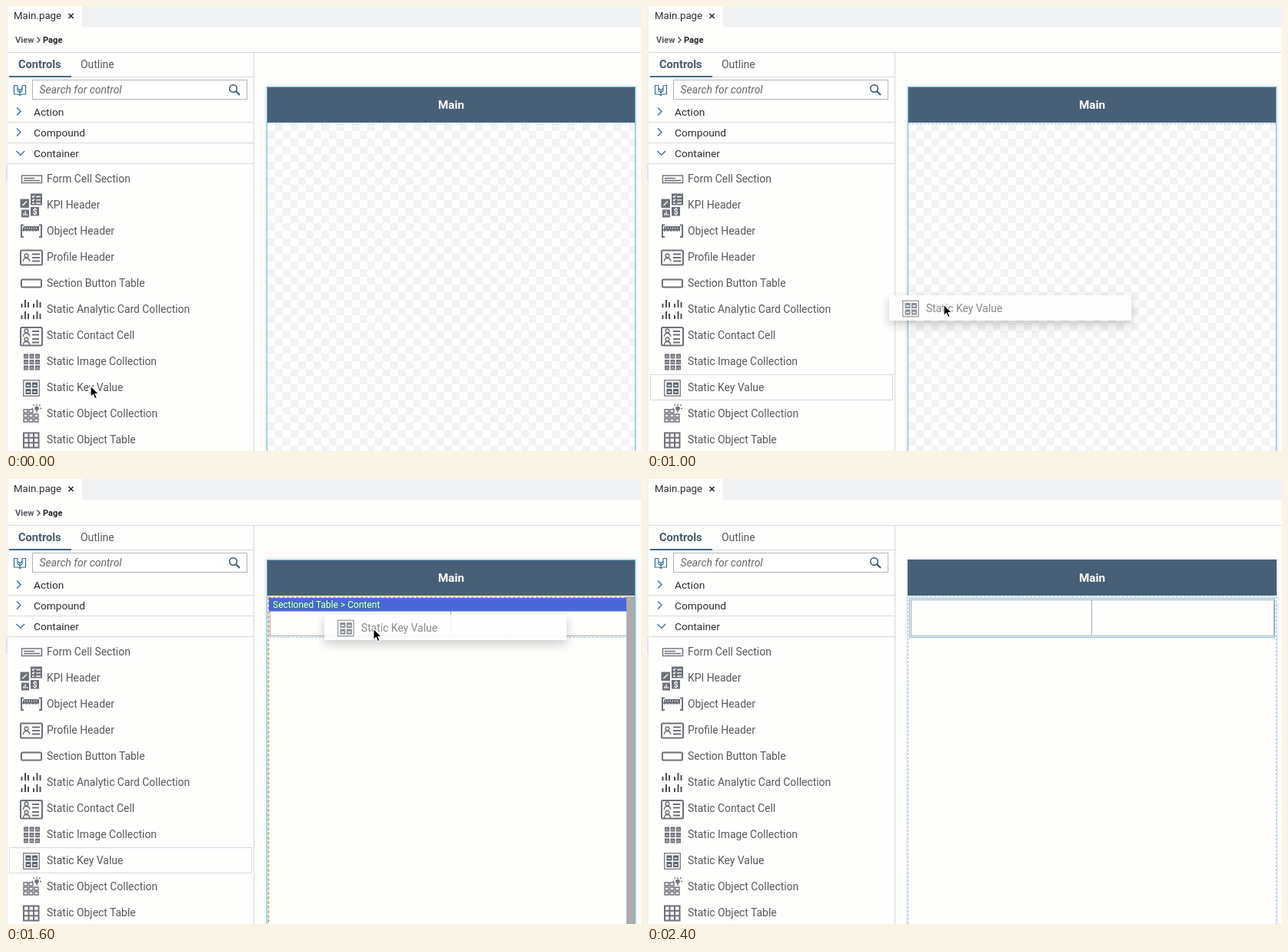
These frames come from a looping animation (826x580 px, 2.8 s). An HTML page:

```html
<!DOCTYPE html>
<html lang="en">
<head>
<meta charset="utf-8">
<title>Drag a control onto a page</title>
<style>
html, body { margin: 0; width: 100%; height: 100%; overflow: hidden; background: #fefefd; }
svg { display: block; width: 826px; height: 580px; font: 13.9px Roboto, "Liberation Sans", sans-serif; }
.dark { fill: #2b2d30; font-size: 13.7px; }
.items { fill: #55585c; }
.ln { fill: none; stroke: #d9d9da; }
.icons { fill: #6d7178; stroke: none; }
.icons .o { fill: none; stroke: #6d7178; stroke-width: 2; }
.icons .t { fill: none; stroke: #6d7178; stroke-width: 1.4; }
.icons .w { fill: none; stroke: #fff; stroke-width: 1.3; }
.sky { fill: none; stroke: #6cc4e4; }
.dash { fill: none; stroke: #8fc7e6; stroke-dasharray: 3 2; }
.grey { fill: none; stroke: #a9a9ab; }

.a { animation: 2.8s step-end infinite; }
.arrow { animation-name: arrow; }
.hand { animation-name: hand; }
.ghost { animation-name: ghost; }
.hover { animation-name: hover; }
.help { animation-name: help; }
.empty { animation-name: empty; }
.over { animation-name: over; }
.done { animation-name: done; }
.crumb { animation-name: crumb; }
.line { animation-name: line; }
.tint { animation-name: tint; }

@keyframes arrow {
  0% { opacity: 1; transform: translate(110px, 495px); }
  7.14% { opacity: 1; transform: translate(100px, 500px); }
  14.28% { opacity: 0; transform: translate(100px, 500px); }
  35.71% { opacity: 1; transform: translate(386px, 389px); }
  42.85% { opacity: 1; transform: translate(464px, 263px); }
  50% { opacity: 1; transform: translate(482px, 188px); }
  57.14% { opacity: 1; transform: translate(478px, 195px); }
  64.28%, 100% { opacity: 0; transform: translate(478px, 195px); }
}
@keyframes hand {
  0% { opacity: 0; transform: translate(92px, 499px); }
  14.28% { opacity: 1; transform: translate(92px, 499px); }
  21.42% { opacity: 1; transform: translate(69.5px, 499px); }
  28.57% { opacity: 1; transform: translate(98.5px, 499px); }
  35.71% { opacity: 0; transform: translate(98.5px, 499px); }
  64.28% { opacity: 1; transform: translate(482px, 189px); }
  78.57%, 100% { opacity: 0; transform: translate(482px, 189px); }
}
@keyframes ghost {
  0% { opacity: 0; transform: translate(315px, 377px); }
  35.71% { opacity: 1; transform: translate(315px, 377px); }
  42.85% { opacity: 1; transform: translate(397px, 257px); }
  50% { opacity: 1; transform: translate(419px, 170px); }
  57.14% { opacity: 1; transform: translate(414px, 177px); }
  64.28%, 100% { opacity: 0; transform: translate(414px, 177px); }
}
@keyframes hover { 0%, 71.42%, 100% { opacity: 0; } 14.28% { opacity: 1; } }
@keyframes help { 0%, 35.71%, 100% { opacity: 0; } 14.28% { opacity: 1; } }
@keyframes empty { 0%, 100% { opacity: 1; } 42.85% { opacity: 0; } }
@keyframes over { 0%, 71.42%, 100% { opacity: 0; } 42.85% { opacity: 1; } }
@keyframes done { 0%, 100% { opacity: 0; } 71.42% { opacity: 1; } }
@keyframes crumb { 0%, 100% { opacity: 1; } 71.42% { opacity: 0; } }
@keyframes line { 0%, 100% { opacity: .5; } 35.71% { opacity: 1; } }
@keyframes tint { 0%, 57.14%, 100% { opacity: 0; } 50% { opacity: 1; } }
</style>
</head>
<body>
<svg viewBox="0 0 826 580" xmlns="http://www.w3.org/2000/svg">
<defs>
  <pattern id="check" x="340" y="153" width="20" height="20" patternUnits="userSpaceOnUse">
    <rect width="20" height="20" fill="#fefefe"/>
    <path d="M10 0h10v10h-10zM0 10h10v10h-10z" fill="#f3f3f4"/>
  </pattern>
  <filter id="soft" x="-10%" y="-100%" width="120%" height="350%">
    <feDropShadow dx="0" dy="5" stdDeviation="7" flood-color="#000" flood-opacity=".24"/>
  </filter>
  <filter id="edge" x="-5%" y="-5%" width="110%" height="110%">
    <feDropShadow dx="0" dy="0" stdDeviation="2" flood-color="#000" flood-opacity=".2"/>
  </filter>
  <g id="person">
    <circle cx="0" cy="-2.6" r="2.4"/>
    <path d="M-4.2 5c0-6 8.400-6 8.400 0"/>
  </g>
  <path id="bars" d="M1 5v5M5.500 0v10M9.500 3v7" fill="none" stroke="#4d5056" stroke-width="2"/>
  <g id="keys">
    <rect x=".75" y=".75" width="20.500" height="20.500" fill="#fdfdfd" stroke="#84878c" stroke-width="1.500"/>
    <path d="M3.500 3.500h7v7h-7zM12 3.500h7v7h-7zM3.500 12h7v7h-7zM12 12h7v7h-7z" fill="#5d6670"/>
    <path d="M5 7.500h4M13.500 7.500h4M5 16h4M13.500 16h4" stroke="#fff" stroke-width="1.300"/>
  </g>
</defs>

<rect width="826" height="580" fill="#fefefd"/>

<!-- Tab strip and breadcrumb -->
<rect x="99" width="727" height="27.500" fill="#f1f2f4"/>
<text x="10" y="17" class="dark" style="font-size:13.300px">Main.page</text>
<path d="M81.500 10l6 6m0-6l-6 6" stroke="#222" stroke-width="1.500"/>
<g class="a crumb" font-size="11.100" font-weight="700">
  <text x="12" y="48" fill="#55585d">View</text>
  <path d="M40.500 40.500l3.500 3.700-3.500 3.700" fill="none" stroke="#444" stroke-width="1.300"/>
  <text x="48" y="48" fill="#222">Page</text>
</g>

<!-- Side panel -->
<rect width="2" height="580" fill="#f2f2f4"/>
<rect y="207" width="2" height="21" fill="#dfe3f6"/>
<path class="ln" d="M2 60.500H826M322.500 60V580M2 92.500H322M2 151.500H322M2 178.500H322M2 205.500H322"/>
<rect x="4" y="91" width="81" height="2" fill="#3f6a80"/>
<text x="16" y="81" font-size="14.600" font-weight="700" fill="#475b69">Controls</text>
<text x="97" y="81" fill="#55585c">Outline</text>
<rect x="34.500" y="96.500" width="279" height="25" fill="#fff" stroke="#b3b5b8"/>
<text x="43.500" y="114" font-style="italic" fill="#66696d">Search for control</text>
<g fill="none" stroke="#30536f" stroke-width="1.500">
  <circle cx="295.500" cy="107.500" r="4.800"/>
  <path d="M299 111l5 5" stroke-width="2"/>
</g>
<g fill="none" stroke="#377096" stroke-width="1.200">
  <path d="M15 103.500h-4.500v11.500h5.500l2 1.500 2-1.500h5.500v-11.500h-4.500M18 109v7"/>
  <path d="M15 103.500v7l3 2.500 3-2.500v-7M15 107.500l3 2 3-2"/>
</g>
<g fill="none" stroke="#3a6d8f" stroke-width="1.300">
  <path d="M14 132.500l5 5-5 5M14 159.500l5 5-5 5M13.500 189l5.300 5.300 5.300-5.300"/>
</g>
<g class="dark">
  <text x="36" y="143">Action</text>
  <text x="36" y="170">Compound</text>
  <text x="36" y="197">Container</text>
</g>

<g class="a hover"><rect class="ln" x="4.500" y="480.500" width="315" height="33"/></g>
<g class="a help">
  <circle cx="299" cy="497" r="5.600" fill="none" stroke="#4b4e52" stroke-width="1.100"/>
  <text x="299" y="500.500" font-size="9.500" font-weight="700" text-anchor="middle" fill="#4b4e52">?</text>
</g>

<g class="items">
  <text x="53" y="230">Form Cell Section</text>
  <text x="53" y="264">KPI Header</text>
  <text x="53" y="298">Object Header</text>
  <text x="53" y="332">Profile Header</text>
  <text x="53" y="366">Section Button Table</text>
  <text x="53" y="400">Static Analytic Card Collection</text>
  <text x="53" y="434">Static Contact Cell</text>
  <text x="53" y="468">Static Image Collection</text>
  <text x="53" y="502">Static Key Value</text>
  <text x="53" y="536">Static Object Collection</text>
  <text x="53" y="570">Static Object Table</text>
</g>

<g class="icons">
  <!-- Form cell -->
  <rect class="t" x="20.500" y="221" width="26" height="9.500"/>
  <path class="t" d="M23 224.500h14M23 227.500h21"/>
  <!-- KPI tiles -->
  <path d="M32 244.500h15v15h-15zM18.500 251.500h11.500v11.500h-11.500zM20 265.500h10v10h-10zM32 262h11v11.500h-11z"/>
  <path class="w" d="M34 248l1.200 1.200 2-2.400M34 252.500l1.200 1.200 2-2.400M34 257h3M39 248.500h6M39 252.800h6M39 257h6M21.500 260l5.500-5.500M23 273v-3M25.200 273v-5.500M27.500 273v-2"/>
  <text x="37.500" y="271.500" font-size="10" font-weight="700" text-anchor="middle" fill="#fff">$</text>
  <!-- Object header -->
  <path class="o" d="M23 285.500h-3v15.500h3M43 285.500h3v15.500h-3"/>
  <path d="M23 287h20v7l-2-1.500-2 1.500-2-1.500-2 1.500-2-1.500-2 1.500-2-1.500-2 1.500-2-1.500-2 1.500-2-1.500z"/>
  <path class="w" d="M24 289.500h18" stroke-dasharray="1 2"/>
  <!-- Profile -->
  <rect class="o" x="19" y="318.500" width="28" height="19" rx="1.500"/>
  <use href="#person" x="26.500" y="328" class="t"/>
  <path class="o" d="M34 323.500h10M34 328h10M34 332.500h10"/>
  <!-- Button -->
  <rect class="o" x="20" y="356.500" width="26" height="10" rx="1.500"/>
  <!-- Analytic cards -->
  <use href="#bars" x="19.500" y="383"/><use href="#bars" x="35" y="383"/>
  <use href="#bars" x="19.500" y="398"/><use href="#bars" x="35" y="398"/>
  <!-- Contact -->
  <rect class="o" x="19" y="419" width="28" height="23.500" rx="1.500"/>
  <use href="#person" x="26.500" y="426" class="t"/><use href="#person" x="26.500" y="437" class="t"/>
  <path class="o" d="M34 424h9M34 428.500h9M34 434h9M34 438.500h9"/>
  <!-- Image grid -->
  <path d="M23 456.500h21M23 464h21M23 471.500h21" fill="none" stroke="#6d7178" stroke-width="6" stroke-dasharray="6 1.500"/>
  <path class="w" d="M24 458l2-2 2 2M31.500 458l2-2 2 2M39 458l2-2 2 2M24 465.500l2-2 2 2M31.500 465.500l2-2 2 2M39 465.500l2-2 2 2M24 473l2-2 2 2M31.500 473l2-2 2 2M39 473l2-2 2 2" stroke-opacity=".45"/>
  <!-- Key value -->
  <use href="#keys" x="22" y="487"/>
  <!-- Object collection -->
  <path class="t" d="M23 526h5v4h-5zM30 526h5v4h-5zM23 532h5v4h-5zM30 532h5v4h-5zM37 532h5v4h-5zM23 538h5v4h-5zM30 538h5v4h-5zM37 538h5v4h-5z"/>
  <circle cx="40" cy="524.500" r="2.800"/>
  <path class="t" d="M40 527v3M40 519v2M44 524.500h2M35 524.500h-1.500M43 521l1.500-1.500M37 521l-1.500-1.500"/>
  <!-- Object table -->
  <path class="o" d="M23 556.500h19.500v19h-19.500zM29.500 556v20M36 556v20M23 562.800h20M23 569.200h20"/>
</g>

<!-- Page canvas -->
<rect x="339" y="105" width="480" height="490" fill="#fefefd" filter="url(#edge)"/>
<rect x="339" y="105" width="480" height="47" fill="#495f75"/>
<text x="579" y="134" font-size="15.300" font-weight="700" text-anchor="middle" fill="#fff">Main</text>

<g class="a empty">
  <rect x="340" y="153" width="478" height="427" fill="url(#check)"/>
  <g class="a line"><path class="dash" d="M340 153.500H818"/></g>
</g>

<g class="a over">
  <path class="grey" d="M343.500 172V204.500H807M578.500 172V204"/>
  <path class="dash" d="M342 206.500H807" stroke-opacity=".8"/>
  <path d="M341 154H807M341.500 154V580" fill="none" stroke="#c89555" stroke-width="1.500" stroke-dasharray="4 2"/>
  <rect x="342" y="155" width="465" height="17.500" fill="#4c67d9"/>
  <g class="a tint"><rect x="487" y="160" width="248" height="10" fill="#2b7c92"/></g>
  <text x="347" y="168" font-size="12" fill="#fff" stroke="#2b7c92" stroke-width="2" paint-order="stroke">Sectioned Table &gt; Content</text>
  <rect x="807" y="153" width="11" height="427" fill="#acacac"/>
</g>

<g class="a crumb"><path class="sky" d="M339.500 580V105.500H818.500V580"/></g>

<g class="a done">
  <path class="dash" d="M339.500 580V153.500H818.500V580"/>
  <rect x="341.500" y="155.500" width="475" height="51" fill="none" stroke="#79bde2"/>
  <path class="grey" d="M343.500 157.500H815.500V204.500H343.500ZM578.500 157V204"/>
</g>

<!-- Dragged control -->
<g class="a ghost">
  <g opacity=".88">
    <rect width="315" height="33" fill="#fefefe" filter="url(#soft)"/>
    <use href="#keys" x="17" y="6.500" opacity=".8"/>
    <text x="48" y="22" fill="#77797c">Static Key Value</text>
  </g>
</g>

<!-- Pointers -->
<g class="a arrow">
  <path d="M0 0V14.500L3.400 11.400L5.700 16.700L8.200 15.600L6 10.500H10.500Z" fill="#000" stroke="#fff" stroke-width="1.200"/>
</g>
<g class="a hand">
  <path d="M-3.500 8.500C-4 5.500-7.500 2.500-8 0C-8-1.800-5.800-1.500-4.500.5L-5.800-4.500C-6-6.600-3.800-7-3.200-5L-2.500-2.500L-2.800-6.500C-2.500-8.300-.300-8.200 0-6.500L.4-2.500L1.500-6.200C2.200-7.800 4.200-7.200 3.800-5.300L3.300-1.800L5-4C6-5.200 7.500-4.200 7-2.800C6 1 6 4 4.500 5.500L4.300 8.500Z" fill="#fff" stroke="#111" stroke-width="1.200" stroke-linejoin="round"/>
  <path d="M-1.200 2v4M1 2v4M3 2v3.500" stroke="#111" stroke-width=".9"/>
</g>
</svg>
</body>
</html>
```
